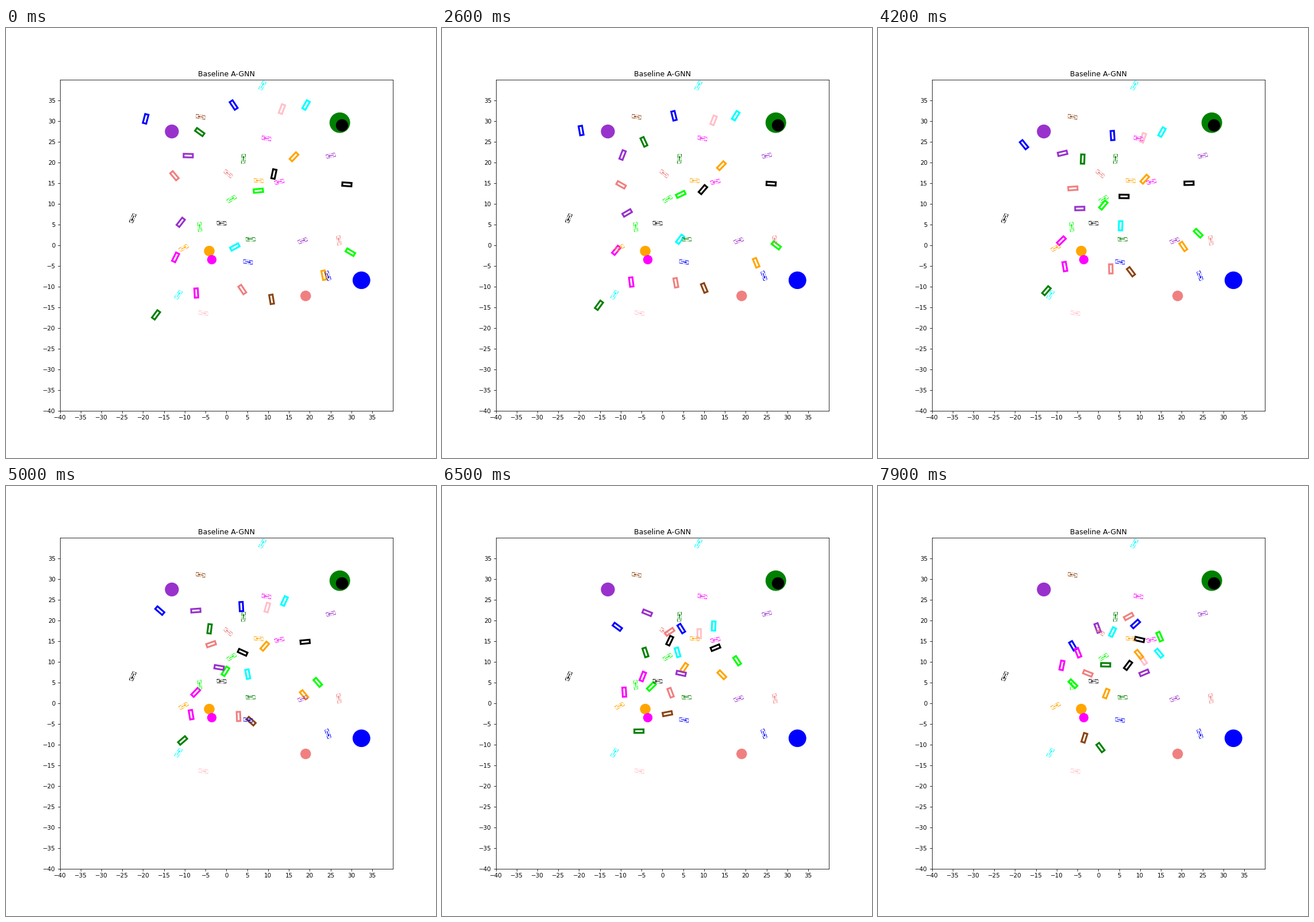
Recreate the animation shown at these times as a matplotlib script. Size 748 px wide and 748 px high, loop 8000 ms.

```python
import numpy as np
import matplotlib.pyplot as plt
from matplotlib.animation import FuncAnimation
from matplotlib.patches import Circle, Polygon

STAGE, INCHES = 748, 10
STEPS = 78                       # simulation steps in one loop
LENGTH, WIDTH = 16, 6            # vehicle size in pixels


def travel(step):
    """Share of the route done: all vehicles speed up from rest."""
    return (step / STEPS) ** 1.8


KEYS = travel(np.array([0, 41, 60, STEPS]))

fig, ax = plt.subplots(figsize=(INCHES, INCHES), dpi=STAGE / INCHES)
ax.set(xlim=(-40, 40), ylim=(-40, 40), title="Baseline A-GNN",
       xticks=range(-40, 40, 5), yticks=range(-40, 40, 5))


def to_data(points):
    """Stage pixels (y down) to axes units."""
    box = ax.get_position()
    share = np.array(points) / STAGE * [1, -1] + [0, 1]
    return (share - box.min) / box.size * 80 - 40


def place(shape, spot, angle):
    """Turn a shape around its middle, then move it to a spot."""
    c, s = np.cos(angle), np.sin(angle)
    return to_data(np.array(shape) @ [[c, -s], [-s, -c]] + spot)


L, W = LENGTH / 2, WIDTH / 2
BOX = [(-L, -W), (L, -W), (L, W), (-L, W)]
ARROW = [(-5, 0), (2, 0), (2, -1.2), (5, 0), (2, 1.2), (2, 0)]


def outline(color, **style):
    return ax.add_patch(Polygon(np.array(BOX), fill=False, ec=color, **style))


class Vehicle:
    """Drives a smooth cubic route, always facing along it."""

    def __init__(self, color, *route):
        self.curve = np.polyfit(KEYS, np.array(route), 3)
        self.body = outline(color, lw=3, zorder=3)

    def move(self, u):
        spot = u ** np.arange(3, -1, -1) @ self.curve
        dx, dy = np.array([3 * u * u, 2 * u, 1]) @ self.curve[:3]
        self.body.set_xy(place(BOX, spot, np.arctan2(-dy, dx)))


def goal(color, x, y, degrees):
    angle = np.radians(degrees)
    outline(color, lw=1, ls="-.", zorder=4).set_xy(place(BOX, (x, y), angle))
    ax.add_patch(Polygon(place(ARROW, (x, y), angle), fc=color, ec=color,
                         lw=0.7, zorder=4))


def obstacle(color, x, y, radius):
    ax.add_patch(Circle(to_data((x, y)), radius, color=color, zorder=2))


VIOLET, CORAL, BROWN = "darkorchid", "lightcoral", "saddlebrown"

obstacle(VIOLET, 288.5, 180, 1.6)
obstacle("green", 580.7, 164.7, 2.4)
obstacle("black", 584.5, 169.3, 1.4)
obstacle("orange", 353.6, 388, 1.2)
obstacle("magenta", 358, 403, 1.05)
obstacle(CORAL, 521.3, 466, 1.2)
obstacle("blue", 618.3, 438.8, 2.05)

goal("cyan", 446, 100, 60)
goal(BROWN, 338.5, 154.5, 170)
goal("magenta", 453, 192, 170)
goal(VIOLET, 565, 222, 193)
goal("green", 413, 227.5, 85)
goal(CORAL, 386.5, 253.5, 140)
goal("orange", 439.5, 265.5, 175)
goal("magenta", 475.5, 267.5, 193)
goal("lime", 392.5, 297.5, 31)
goal("black", 220.5, 331, 246)
goal("lime", 337, 346, 95)
goal("black", 375, 339.5, 178)
goal("green", 424.5, 367, 180)
goal(VIOLET, 516, 370, 20)
goal(CORAL, 579, 369.5, 97)
goal("orange", 309, 382.5, 28)
goal("blue", 421, 407, -8)
goal("blue", 560, 431, -70)
goal("cyan", 300, 464, 57)
goal("pink", 343.5, 496, -8)

vehicles = [
    Vehicle("blue", (243, 158), (254, 203), (294, 237), (339, 278)),
    Vehicle("blue", (396, 134), (408, 187), (413, 240), (448, 240)),
    Vehicle("pink", (480, 141), (461, 191), (448, 244), (461, 303)),
    Vehicle("cyan", (522, 134), (494, 181), (474, 231), (489, 291)),
    Vehicle("green", (337, 181), (356, 228), (352, 279), (396, 311)),
    Vehicle(VIOLET, (317, 222), (321, 218), (349, 218), (382, 247)),
    Vehicle("orange", (501, 224), (464, 263), (429, 305), (397, 361)),
    Vehicle("black", (466, 254), (428, 293), (396, 275), (455, 267)),
    Vehicle(CORAL, (293, 257), (339, 279), (385, 261), (436, 227)),
    Vehicle("lime", (439, 283), (392, 308), (369, 343), (339, 344)),
    Vehicle("black", (593, 272), (541, 270), (488, 277), (435, 312)),
    Vehicle(VIOLET, (304, 338), (351, 314), (403, 323), (463, 325)),
    Vehicle("cyan", (398, 381), (422, 344), (413, 300), (408, 254)),
    Vehicle("lime", (599, 390), (557, 357), (521, 315), (490, 262)),
    Vehicle("orange", (553, 430), (531, 380), (496, 338), (454, 293)),
    Vehicle(CORAL, (411, 455), (405, 419), (401, 371), (365, 326)),
    Vehicle(BROWN, (462, 472), (440, 424), (402, 396), (359, 438)),
    Vehicle("magenta", (295, 399), (319, 370), (345, 340), (348, 290)),
    Vehicle("magenta", (331, 461), (325, 415), (318, 370), (320, 312)),
    Vehicle("green", (261, 499), (293, 457), (332, 428), (387, 455)),
]


def draw(frame):
    u = travel(max(0, frame - 1))  # the start pose is held for two frames
    for vehicle in vehicles:
        vehicle.move(u)
    return []


anim = FuncAnimation(fig, draw, frames=STEPS + 2, interval=100, repeat=True,
                     repeat_delay=0)
plt.show()
```
